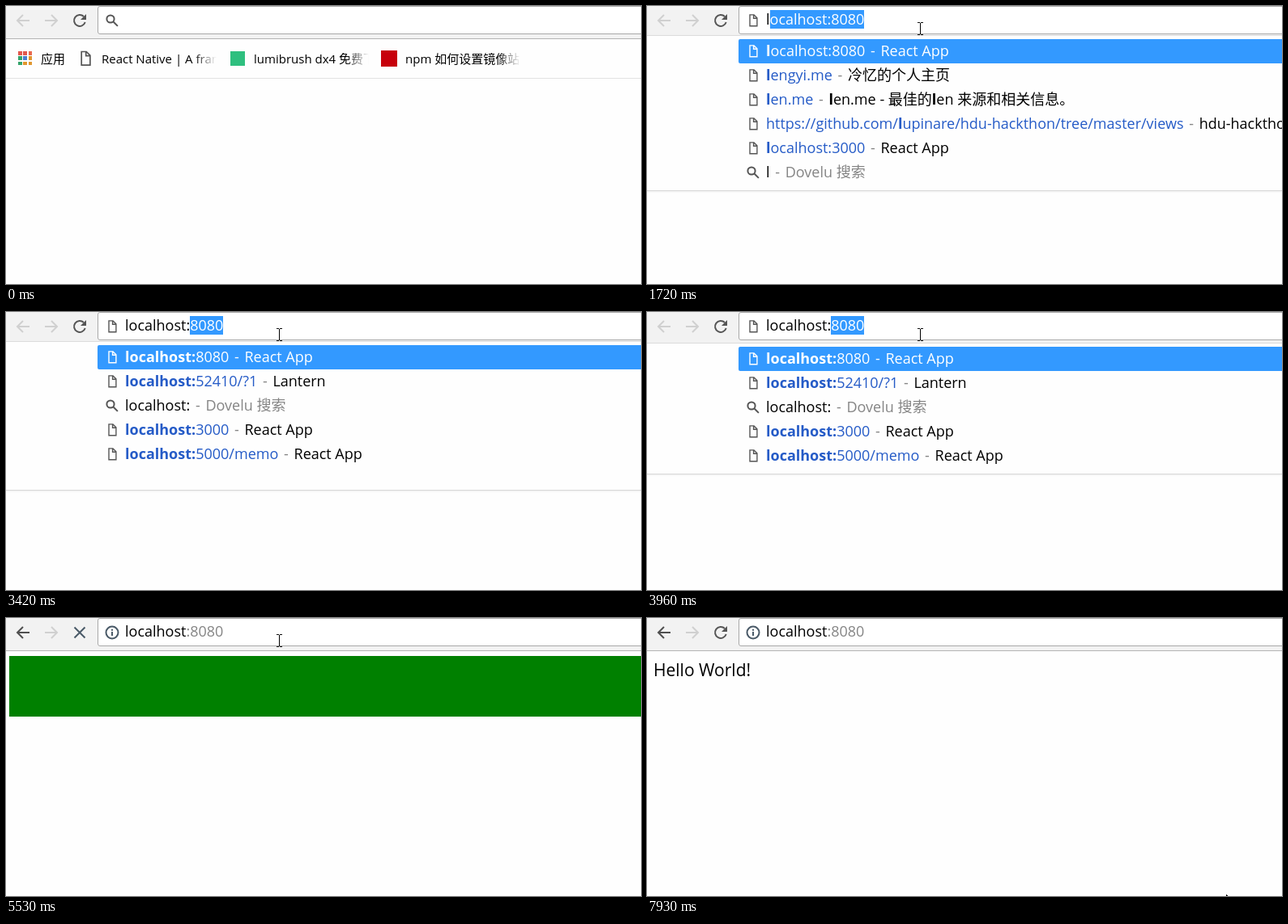
An HTML page for the animation above (8 s loop, 784x344 px).

```html
<!DOCTYPE html>
<html lang="zh">
<head>
<meta charset="utf-8">
<style>
html, body { margin: 0; width: 100%; height: 100%; overflow: hidden; background: #fefefe; }
body { position: relative; font: 18px "Open Sans", "Noto Sans CJK SC", "Noto Sans CJK", sans-serif; color: #000; white-space: pre; }
body > * { position: absolute; }
svg { fill: none; stroke: currentColor; stroke-width: 2; overflow: visible; color: #555; }
svg.thin { stroke-width: 1.4; }
#bar { left: 0; top: 0; width: 784px; height: 40px; background: #f2f2f2; border-bottom: 1px solid #b4b4b4; }
#marks { left: 0; top: 41px; width: 784px; height: 48px; border-bottom: 1px solid #e2e2e2; font-size: 15px; line-height: 48px; }
#marks > * { position: absolute; top: 0; }
.fade { width: 142px; overflow: hidden; -webkit-mask-image: linear-gradient(90deg, #000 80%, transparent); mask-image: linear-gradient(90deg, #000 80%, transparent); }
#popup { left: 0; width: 784px; box-sizing: border-box; overflow: hidden; background: #fefefe; border-top: 1px solid #dcdcdc; border-bottom: 1px solid #d8d8d8; box-shadow: 0 1px 2px #0001; }
.row { position: relative; top: 4px; margin-left: 113px; padding-left: 34px; height: 30px; line-height: 28px; border-radius: 2px 0 0 2px; }
.row svg { position: absolute; left: 8px; top: 5px; }
.row a { color: #255bc7; }
.row i { font-style: normal; color: #858585; }
.row .dash { padding: 0 2px; }
.row:first-child { background: #39f; }
.row:first-child, .row:first-child * { color: #fff; }
#box { left: 113px; top: 0; width: 700px; height: 33px; background: #fff; border: 1px solid #a9a9a9; border-radius: 3px; }
#nav { left: 0; top: 0; }
#url { left: 147px; top: 5px; height: 23px; line-height: 23px; }
#url span { display: inline-block; height: 23px; background: #39f; color: #fff; }
#url i { font-style: normal; color: #858585; }
#caret { top: 5px; width: 1px; height: 23px; background: #222; }
#green { left: 4px; top: 47px; width: 780px; height: 75px; background: #008000; }
#hello { left: 8px; top: 50px; font-size: 21px; line-height: 29px; }
</style>
</head>
<body>
<div id="bar"></div>
<div id="marks"></div>
<div id="popup"></div>
<div id="box"></div>
<div id="nav"></div>
<div id="url"></div>
<div id="caret"></div>
<div id="green"></div>
<div id="hello">Hello World!</div>
<svg id="arrow" width="12" height="19" style="left:0;top:0"><path d="M.5.5V16l3.6-3.4 2.6 5.8 2.3-1-2.6-5.6h5z" fill="#fff" stroke="#000" stroke-width="1"/></svg>
<svg id="beam" width="8" height="16" style="left:-3px;top:-8px"><path d="M0 .5h3M4 .5h3M3.5 1v14M0 15.5h3M4 15.5h3" stroke="#000" stroke-width="1"/></svg>
<script>
const $ = id => document.getElementById(id);
const set = (id, html) => { const e = $(id); if (e.html !== html) e.innerHTML = e.html = html; };
const show = (id, on) => { $(id).style.visibility = on ? 'visible' : 'hidden'; };

// Icons
const DOC = 'M6 2.9h5l3.9 3.9v9.9H6zM10.6 3v4.2h4.2';
const LENS = 'M12.6 8a4.6 4.6 0 1 1-9.2 0a4.6 4.6 0 1 1 9.2 0M11.3 11.3l5.6 5.6';
const INFO = 'M17.5 10a7.5 7.5 0 1 1-15 0a7.5 7.5 0 1 1 15 0M10 9v5M10 5.8v2';
const BACK = 'M20 12H5M12 5l-7 7 7 7';
const NEXT = 'M4 12h15M12 5l7 7-7 7';
const STOP = 'M5.5 5.5l13 13M18.5 5.5l-13 13';
const LOAD = 'M18.7 14A7 7 0 1 1 17 7';
const HEAD = '<path d="M20 4v7h-7z" fill="currentColor" stroke="none"/>';
const icon = (d, size = 20, style = '', extra = '') =>
  `<svg class="${d === DOC ? 'thin' : ''}" width="${size}" height="${size}" style="${style}"><path d="${d}"/>${extra}</svg>`;
const at = (x, y, color = '#555') => `position:absolute;left:${x}px;top:${y}px;color:${color}`;

// Bookmarks
const dots = ['#e2574c', '#e2574c', '#e8674c', '#35a36b', '#4a7fd0', '#e0962e', '#35a36b', '#e0962e', '#e0962e']
  .map((c, i) => `<div style="${at(15 + i % 3 * 6.3, 15 + (i / 3 | 0) * 6.3)};width:4.5px;height:4.5px;background:${c}"></div>`).join('');
const square = (x, y, size, color) => `<div style="${at(x, y)};width:${size}px;height:${size}px;background:${color}"></div>`;
const label = (x, text) => `<div class="fade" style="left:${x}px">${text}</div>`;
set('marks', dots + label(43, '应用') +
  icon(DOC, 20, at(88, 14) + ';transform:scale(1.2)') + label(118, 'React Native | A framework') +
  square(277, 15, 18, '#2fbf7f') + label(306, 'lumibrush dx4 免费下载') +
  square(463, 14, 20, '#c7000b') + label(493, 'npm 如何设置镜像站点'));

// Suggestions
const HOST = 'localhost:8080';
const dash = '<i class="dash"> - </i>';
const bold = (s, n) => `<b>${s.slice(0, n)}</b>${s.slice(n)}`;
const row = (d, html) => `<div class="row">${icon(d)}${html}</div>`;
const link = (s, n, title = 'React App') => row(DOC, `<a>${bold(s, n)}</a>${dash}${title}`);
const find = html => row(LENS, `${html}${dash}<i>Dovelu 搜索</i>`);

function rows(n) {
  const q = HOST.slice(0, n), m = Math.min(n, 10);
  const top = link(HOST, n);
  const lantern = link('localhost:52410/?1', m, 'Lantern');
  const dev = link('localhost:3000', m), memo = link('localhost:5000/memo', m);
  if (n < 2) return [top,
    link('lengyi.me', 1, '冷忆的个人主页'),
    link('len.me', 1, '<b>l</b>en.me - 最佳的<b>l</b>en 来源和相关信息。'),
    row(DOC, `<a>https://github.com/<b>l</b>upinare/hdu-hackthon/tree/master/views</a>${dash}hdu-hackthon/views`),
    dev, find(q)];
  if (n < 10) return [top, lantern, dev, memo, find(`${q}<b>${'localhost'.slice(n)}</b>`), row(LENS, q)];
  if (n < 13) return [top, lantern, find(q), dev, memo];
  return [top, link(HOST + '/memo', n), find(q)];
}

// Time of each key press
const keys = [1550, 1870, 2030, 2190, 2410, 2490, 2650, 2720, 3040, 3420, 4030, 4270, 4510, 4810];
const within = (t, a, b) => t >= a && t < b;

function drawPopup(t, n) {
  const on = n > 0 && t < 5130;
  show('popup', on);
  if (!on) return;
  const list = rows(n);
  const raised = t < 1870 || within(t, 3420, 3960) || within(t, 4270, 4810);
  const shrink = (start, count) => count * 30 * Math.max(0, 1 - (t - start + 50) / 200);
  let height = 13 + list.length * 30;
  if (n === 10) height += shrink(3420, 1);
  if (n === 13) height += shrink(4510, 2);
  $('popup').style.top = (raised ? 36 : 38) + 'px';
  $('popup').style.height = height + 'px';
  set('popup', list.join(''));
}

// Pointer moves: start, number of steps, corner points
const moves = [
  [70, 8, [[598, 336], [545, 250], [450, 140], [370, 55], [337, 28]]],
  [6220, 2, [[372, 72], [430, 145], [468, 187]]],
  [6920, 6, [[500, 212], [536, 237], [430, 200], [300, 150], [220, 96]]],
  [7540, 5, [[233, 122], [295, 157], [463, 184], [527, 228], [620, 285], [715, 342]]]
];

function drawPointer(t) {
  const seen = t >= 70 && !within(t, 700, 850);
  const [start, steps, pts] = moves.filter(m => t >= m[0]).pop() || moves[0];
  const k = Math.min(steps, Math.max(0, Math.floor((t - start) / 78 + 0.05)));
  const u = k / steps * (pts.length - 1), i = Math.min(Math.floor(u), pts.length - 2);
  const [x, y] = pts[i].map((v, j) => Math.round(v + (pts[i + 1][j] - v) * (u - i)));
  const text = y < 35;
  show('arrow', seen && !text);
  show('beam', seen && text);
  $('arrow').style.transform = $('beam').style.transform = `translate(${x}px,${y}px)`;
}

function draw(t) {
  const n = keys.filter(k => t >= k).length;
  const opened = t >= 5360, loading = within(t, 5360, 5600);
  set('nav',
    icon(BACK, 24, at(9, 6, opened ? '#505050' : '#d0d0d0')) +
    icon(NEXT, 24, at(44, 6, '#d0d0d0')) +
    icon(loading ? STOP : LOAD, 24, at(79, 6, loading ? '#4a5a68' : '#555'), loading ? '' : HEAD) +
    icon(opened ? INFO : n ? DOC : LENS, 20, at(121, 8, opened ? '#4a5a68' : '#555')));
  set('url', !n ? '' : n < 14 ? `${HOST.slice(0, n)}<span>${HOST.slice(n)}</span>` : 'localhost<i>:8080</i>');
  show('marks', !opened);
  drawPopup(t, n);
  show('caret', within(t, 700, 1320) || within(t, 4810, 5130));
  $('caret').style.left = (n ? 268 : 147) + 'px';
  show('green', within(t, 5530, 5600));
  show('hello', t >= 5600);
  drawPointer(t);
}

const begin = performance.now();
function tick() {
  draw((performance.now() - begin) % 8000);
  requestAnimationFrame(tick);
}
tick();
</script>
</body>
</html>
```
